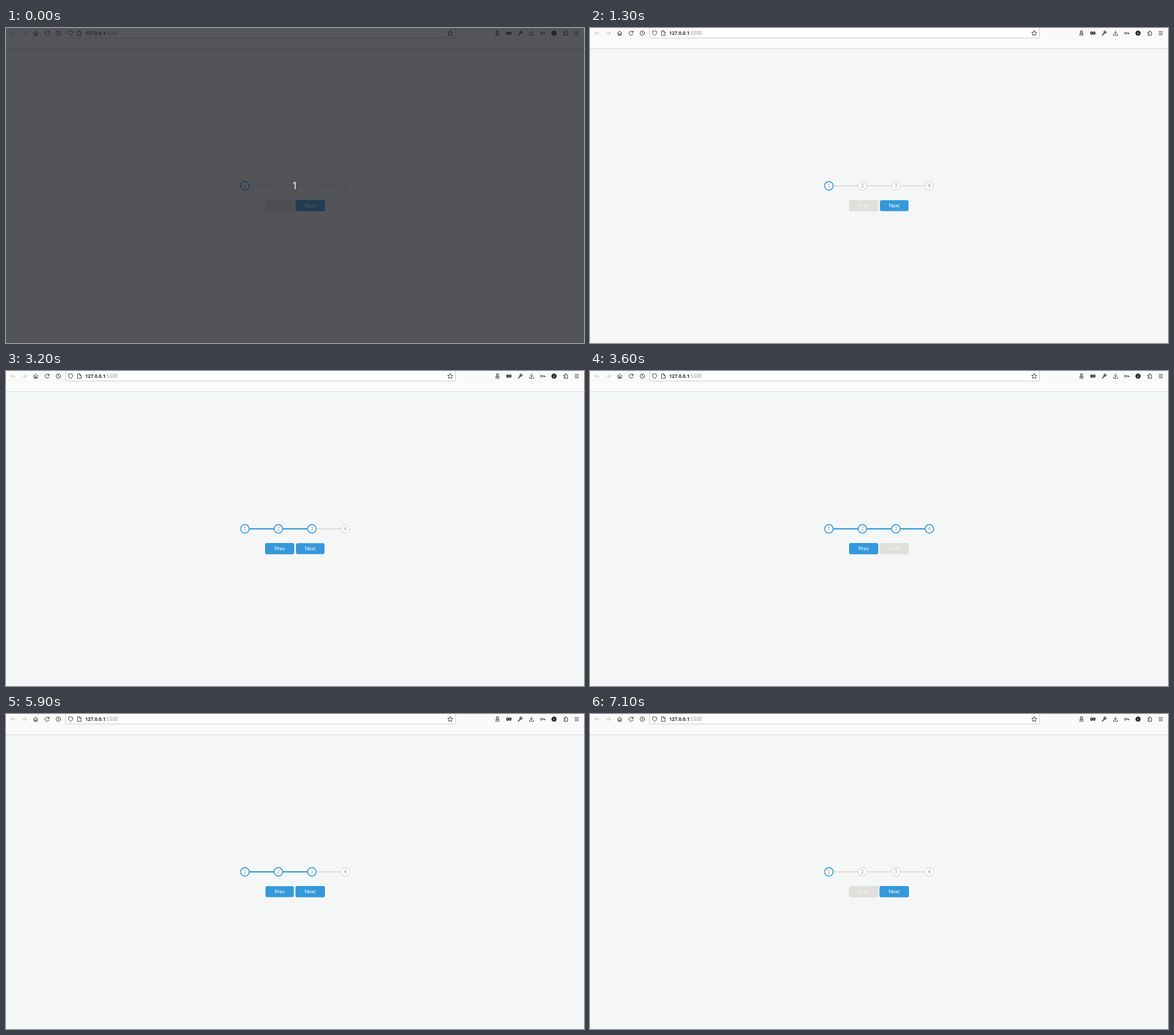
These frames come from a looping animation (1013 by 553 pixels, 8.1 s). An HTML page:

```html
<!DOCTYPE html>
<html lang="en">
<head>
<meta charset="utf-8">
<title>Progress steps</title>
<style>
  html, body { margin: 0; width: 100%; height: 100%; overflow: hidden; background: #f5f7f6; }
  svg { display: block; width: 100%; height: 100%; }
  text { font-family: Lato, sans-serif; font-size: 9.2px; text-anchor: middle; }
  .icon { fill: none; stroke: #3b3b3d; stroke-width: 1; stroke-linecap: round; stroke-linejoin: round; }
  .faded { stroke: #bababa; }
  .solid { fill: #2f2f31; stroke: none; }
  .address { font-family: "Noto Sans", sans-serif; font-size: 8.4px; text-anchor: start; fill: #8b8b8d; }
  .host { font-weight: 600; fill: #2e2e30; }
  .step circle { fill: #fff; stroke-width: 1.7; }
  .step text { fill: #999; }
  .button { transform-box: fill-box; transform-origin: center; }
  .count { font-family: "Noto Sans", sans-serif; font-size: 17.5px; fill: #f4ffff; }
</style>
</head>
<body>
<svg viewBox="0 0 1013 553" xmlns="http://www.w3.org/2000/svg">
  <rect width="1013" height="553" fill="#f5f7f6"/>
  <rect width="1013" height="36" fill="#f9faf9"/>
  <path d="M0 36.5H1013" stroke="#d0d2d1"/>
  <rect x="104.5" y="-.5" width="683" height="18" rx="1" fill="#fff" stroke="#cbccca"/>

  <g class="icon">
    <path class="faded" d="M16.5 9H9M12 5.8L8.8 9L12 12.2M28.5 9H36M33 5.8L36.2 9L33 12.2"/>
    <path d="M48.3 8.8L52 5.3L55.7 8.8M49.2 8.4V12.8H54.8V8.4M51.2 12.6V10H52.8V12.6"/>
    <path d="M75.3 7.2A3.7 3.7 0 1 0 75.7 10M75.7 5.2V7.6H73.2"/>
    <circle cx="91.8" cy="9" r="4"/>
    <path d="M91.8 6.5V9.2L93.5 10.2"/>
    <path d="M113.2 4.9L117 6.2C117 9.6 116 11.7 113.2 13.2C110.4 11.7 109.4 9.6 109.4 6.2Z"/>
    <path d="M125.8 5H129.3L131.6 7.3V13H125.8ZM129 5.2V7.6H131.4"/>
    <path id="star"/>

    <circle cx="861.3" cy="7" r="2"/>
    <path d="M859.8 5.3L861.3 4.5L862.8 5.3M859.8 8.8L858 10.2H864.6L862.8 8.8M857.8 12.5H864.8"/>
    <path class="solid" fill-rule="evenodd" d="M881.3 7.1C883.2 5.9 886 6 886 8.3C886 11 884.3 12.4 882.8 11.7L881.3 10.6L879.8 11.7C878.3 12.4 876.6 11 876.6 8.3C876.6 6 879.4 5.9 881.3 7.1ZM877.9 8.6Q879.2 7.2 880.4 9Q879 10.2 877.9 8.6ZM884.7 8.6Q883.4 7.2 882.2 9Q883.6 10.2 884.7 8.6Z"/>
    <path d="M898 12.4L902 8.4" stroke-width="1.7"/>
    <path d="M904.7 6.7A2.1 2.1 0 1 1 902.7 5L902.6 7.1Z" stroke-width="1.1"/>
    <path d="M921 4.8V10M918.7 7.9L921 10.2L923.3 7.9M917.4 10.8V12.8H924.6V10.8"/>
    <circle cx="938.5" cy="9" r="1.9"/>
    <path d="M940.5 9H945V10.5M943 9V10.2"/>
    <circle class="solid" cx="960.5" cy="9" r="4.6"/>
    <path d="M978 7.2H980V6A1.2 1.2 0 0 1 982.4 6V7.2H984.2V12.9H978V11.1H979A1.1 1.1 0 0 0 979 8.9H978Z"/>
    <path d="M997 6.2H1003.5M997 9H1003.5M997 11.8H1003.5"/>
  </g>
  <text x="960.6" y="11" style="font-size:5.5px" fill="#fff">L</text>
  <text class="address" x="138.7" y="12"><tspan class="host">127.0.0.1</tspan>:5500</text>

  <path d="M411 277.1H602" stroke="#dfe0dd" stroke-width="2.2"/>
  <rect id="bar" x="411" y="276" height="2.2" fill="#3498db"/>
  <g id="steps"></g>
  <g id="buttons"></g>

  <g id="countdown">
    <rect width="1013" height="553" fill="rgb(28,30,38)" opacity=".75"/>
    <text class="count" x="506.3" y="283">1</text>
  </g>
</svg>
<script>
const LOOP = 8100, TICK = 100, DURATION = 400;
const GREY = [223, 224, 220], BLUE = [52, 152, 219];
const SPAN = 192.3;

// Each click: button goes down, transition begins, button comes up, step reached.
const clicks = [
  { button: 1, down: 1300, begin: 1250, up: 1400, step: 2 },
  { button: 1, down: 2300, begin: 2300, up: 2400, step: 3 },
  { button: 1, down: 3200, begin: 3200, up: 3300, step: 4 },
  { button: 0, down: 4900, begin: 5000, up: 5100, step: 3 },
  { button: 0, down: 5900, begin: 5900, up: 6000, step: 2 },
  { button: 0, down: 6700, begin: 6700, up: 6800, step: 1 }
];

const byId = id => document.getElementById(id);
const clamp = v => Math.min(1, Math.max(0, v));
const rgb = c => `rgb(${c.map(Math.round)})`;
const mix = k => rgb(GREY.map((g, i) => g + (BLUE[i] - g) * k));

function add(parent, tag, attrs, text) {
  const el = document.createElementNS("http://www.w3.org/2000/svg", tag);
  for (const name in attrs) el.setAttribute(name, attrs[name]);
  if (text) el.textContent = text;
  return parent.appendChild(el);
}

// The CSS "ease" curve: cubic-bezier(.25, .1, .25, 1).
function ease(x) {
  if (x <= 0 || x >= 1) return clamp(x);
  const bezier = (a, b, u) => 3 * a * u * (1 - u) ** 2 + 3 * b * u * u * (1 - u) + u ** 3;
  let low = 0, high = 1;
  for (let i = 0; i < 24; i++) {
    const mid = (low + high) / 2;
    if (bezier(.25, .25, mid) < x) low = mid; else high = mid;
  }
  return bezier(.1, 1, low);
}

const starPoints = Array.from({ length: 10 }, (_, i) => {
  const angle = -Math.PI / 2 + i * Math.PI / 5, r = i % 2 ? 2.3 : 4.7;
  return `${778.5 + r * Math.cos(angle)} ${9.2 + r * Math.sin(angle)}`;
});
byId("star").setAttribute("d", `M${starPoints.join("L")}Z`);

const rings = [1, 2, 3, 4].map(n => {
  const x = 418.7 + (n - 1) * 58.67;
  const group = add(byId("steps"), "g", { class: "step" });
  const ring = add(group, "circle", { cx: x, cy: 277.1, r: 7.45 });
  add(group, "text", { x, y: 280.4 }, String(n));
  return ring;
});

const buttons = [["Prev", 454, 51.2], ["Next", 507.3, 51.7]].map(([label, x, width]) => {
  const group = add(byId("buttons"), "g", { class: "button" });
  const face = add(group, "rect", { x, y: 302, width, height: 19.7, rx: 3.3 });
  const text = add(group, "text", { x: x + width / 2, y: 315.1 }, label);
  return { group, face, text };
});

function draw(time) {
  const t = Math.floor(time / TICK) * TICK;
  let step = 1, position = 1, pressed = -1;
  for (const c of clicks) {
    if (t >= c.down && t < c.up) pressed = c.button;
    if (t < c.up) break;
    position = step + (c.step - step) * ease((t - c.begin) / DURATION);
    step = c.step;
  }
  byId("bar").setAttribute("width", SPAN * (position - 1) / 3);
  rings.forEach((ring, i) => ring.setAttribute("stroke", mix(clamp(position - i))));
  buttons.forEach(({ group, face, text }, i) => {
    const enabled = i ? step < 4 : step > 1;
    face.setAttribute("fill", rgb(enabled ? BLUE : GREY));
    text.setAttribute("fill", enabled ? "#fff" : "#f1f2ee");
    group.style.transform = pressed === i ? "scale(.97)" : "none";
  });
  byId("countdown").style.display = t < 100 ? "" : "none";
}

const start = performance.now();
function loop() {
  draw((performance.now() - start) % LOOP);
  requestAnimationFrame(loop);
}
loop();
</script>
</body>
</html>
```
